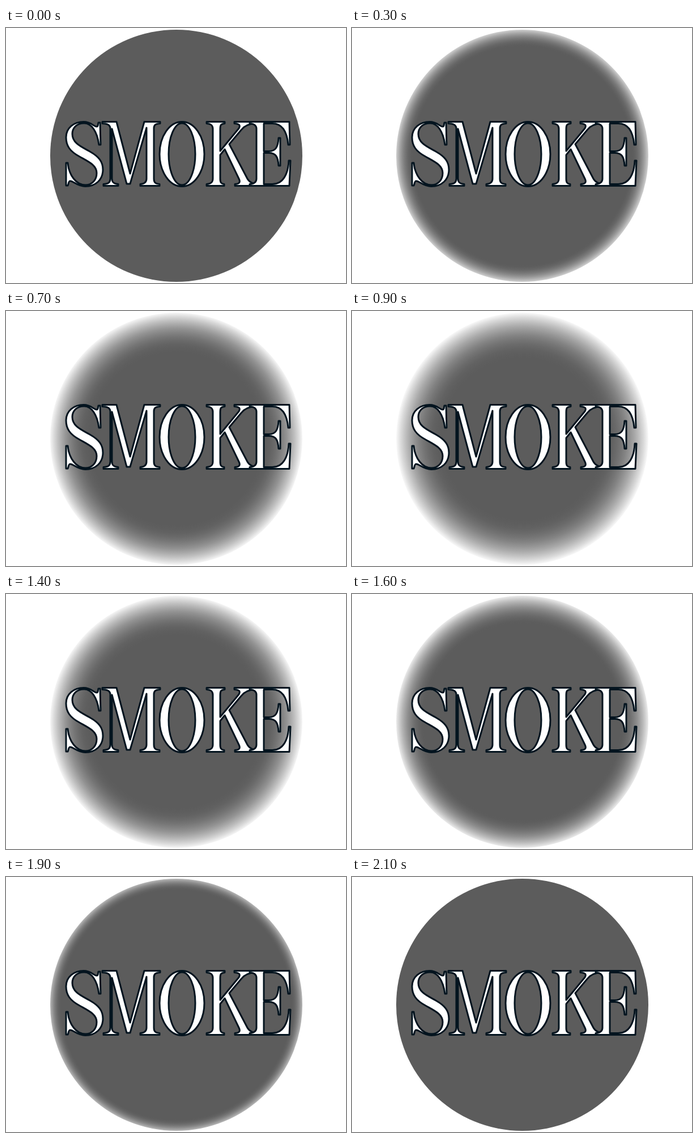
Write an HTML page that moves like this. It is 600 px wide and 450 px high and loops after 2200 ms.

```html
<!DOCTYPE html>
<html lang="en">
<head>
<meta charset="utf-8">
<title>Smoke</title>
<style>
  html, body { margin: 0; height: 100%; overflow: hidden; background: #fff; }
  svg { display: block; width: 100vw; height: 100vh; }
  .word { fill: #fff; fill-rule: evenodd; stroke: #04141f; stroke-width: 3; stroke-linejoin: round; }
</style>
</head>
<body>
<svg viewBox="0 0 600 450" role="img" aria-label="SMOKE">
  <defs>
    <radialGradient id="fade" gradientUnits="userSpaceOnUse" cx="300.5" cy="225.5" r="222.5"></radialGradient>
  </defs>
  <circle cx="300.5" cy="225.5" r="222.5" fill="url(#fade)"/>
  <g class="word">
    <path d="M163 167H166L167 206H164C161 183 151 168 138 168C125 168 117 176 117 187C117 203 132 209 148 218
      C164 227 171 236 171 250C171 268 158 279.5 140 279.5C126 279.5 119 270 113 270C110 270 110 278 109 278H106V238H109
      C111 260 124 277 140 277C152 277 160 268 160 256C160 242 146 236 130 227C113 218 106 208 106 193
      C106 176 120 165.5 137 165.5C150 165.5 155 174 160 174C163 174 162 170 163 167Z"/>
    <path d="M170 165.5H195L219 257L244 165.5H272V168.5C264 169 261 171 261 177V266C261 273 264 275 271 275.5V278.5H237
      V275.5C244 275 248 272 248 266V176L219 275H213L187 178V266C187 273 191 275 198 275.5V278.5H172V275.5
      C180 275 184 273 184 266V176C183 170 178 168.5 170 168.5Z"/>
    <path d="M271 222.5A39.5 57 0 0 1 350 222.5A39.5 57 0 0 1 271 222.5Z
      M287 222.5A23.5 54.5 0 0 0 334 222.5A23.5 54.5 0 0 0 287 222.5Z"/>
    <path d="M354 165.5H386V168.5C379 169 378 172 378 178V217L411 177C414 172 412 169 403 168.5V165.5H440V168.5
      C428 169 420 173 415 180L394 205L426 266C430 273 436 275 446 275.5V278.5H404V275.5C412 275 414 272 411 266
      L386 214L378 224V266C378 273 380 275 385 275.5V278.5H354V275.5C361 275 365 273 365 266V178C365 171 361 169 354 168.5Z"/>
    <path d="M430 165.5H500L501 206H498C496 184 488 168.5 470 168.5H455V217.5H464C476 217.5 480 210 481 194H484V243H481
      C480 227 476 220.5 464 220.5H455V275.5H470C490 275.5 498 256 499 234H502L500 278.5H430V275.5
      C438 275 442 272 442 266V178C442 172 438 169 430 168.5Z"/>
  </g>
</svg>
<script>
const LOOP = 2200, STEP = 100, RADIUS = 222.5, GRAY = 92, STOPS = 10;
const fade = document.getElementById('fade');
const stops = Array.from({ length: STOPS + 1 }, () =>
  fade.appendChild(document.createElementNS(fade.namespaceURI, 'stop')));

// Fade level 0..8: seven steps out, a pause, the last step, a hold, then back.
function levelAt(t) {
  const n = Math.floor(t / STEP);
  if (n < 9) return Math.min(n, 7);
  return n < 14 ? 8 : 21 - n;
}

function draw(level) {
  const width = level * 10;
  const strength = 1 - 0.5 ** (level * 0.6);
  stops.forEach((stop, i) => {
    const u = i / STOPS;
    const shade = Math.round(GRAY + (255 - GRAY) * strength * u * u);
    stop.setAttribute('offset', 1 - width * (1 - u) / RADIUS);
    stop.setAttribute('stop-color', `rgb(${shade},${shade},${shade})`);
  });
}

const start = performance.now();
function tick() {
  draw(levelAt((performance.now() - start) % LOOP));
  requestAnimationFrame(tick);
}
tick();
</script>
</body>
</html>
```
